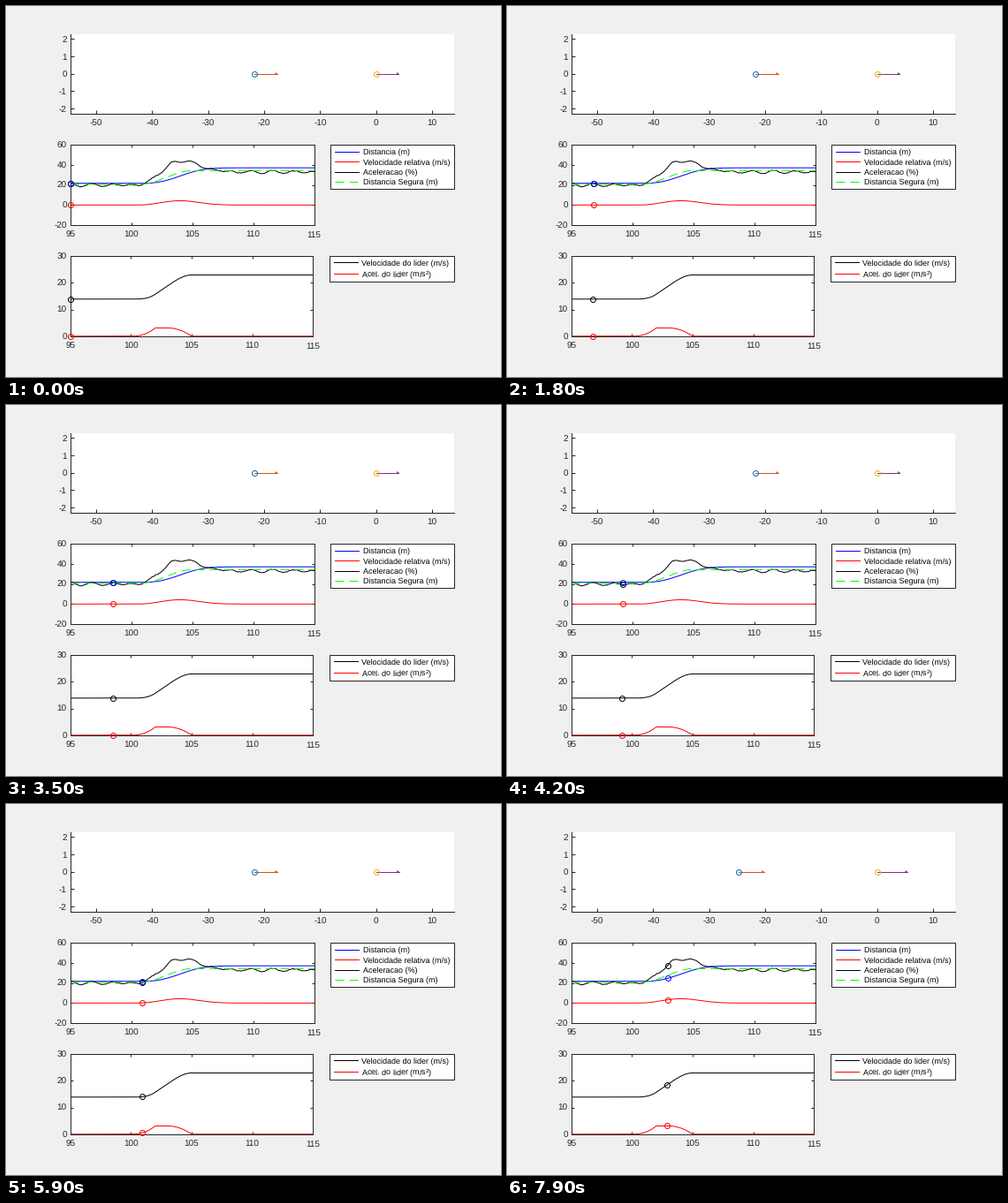
These frames come from a looping animation (560x420 px, 8000 ms). A matplotlib script:

```python
import numpy as np
import matplotlib.pyplot as plt
from matplotlib.animation import FuncAnimation
from matplotlib.patches import Polygon, Rectangle

W, H, PX = 560, 420, 0.72  # stage size and points per pixel
INK, RED, BLUE, GREEN = "#262626", "#ff0000", "#0000ff", "#00ff00"
plt.rcParams.update({
    "font.family": "Liberation Sans", "axes.unicode_minus": False,
    "mathtext.fontset": "custom", "mathtext.rm": "Liberation Sans",
    "mathtext.default": "regular", "lines.linewidth": PX,
    "text.hinting": "none",
})

DT = 0.05
t = 95 + DT * np.arange(401)


def integrate(y):
    return np.concatenate([[0], np.cumsum((y[1:] + y[:-1]) / 2)]) * DT


def ramp(start, end):
    return np.clip((t - start) / (end - start), 0, 1)


def wave(period):
    return np.cos(2 * np.pi * (t - 95.9) / period)


# The leader speeds up between 100 s and 105 s; the follower lags behind.
lead_acc = 3.1 * ramp(100, 102) ** 2.4 * (1 - ramp(103, 105) ** 2)
lead_v = 13.9 + integrate(lead_acc)
rel_v = 4.3 * np.where(t < 104, np.sin(np.pi / 2 * ramp(100.6, 104)) ** 2,
                       np.exp(-((t - 104) / 1.52) ** 2 / 2))
dist = 21.7 + integrate(rel_v)
safe = 1.5 * lead_v
jitter = np.random.default_rng(4).normal(0, .2, t.size // 2 + 1)
throttle = (1.44 * lead_v + 2.6 * rel_v + .8 * lead_acc
            - 1.1 * wave(1.65) - .6 * wave(2.1) + np.interp(t, t[::2], jitter))

fig = plt.figure(figsize=(W / 100, H / 100), dpi=100, facecolor="#f0f0f0")


def panel(bottom, right, xlim, ylim, xticks, yticks, box=True, tick=3, pad=7):
    left = .13
    ax = fig.add_axes([left, bottom, right / W - left, .2157])
    ax.set(xlim=xlim, ylim=ylim, xticks=xticks, yticks=yticks)
    ax.tick_params(direction="in", length=tick * PX, width=PX, color=INK,
                   labelcolor=INK, labelsize=10 * PX, top=box, right=box)
    ax.tick_params(axis="x", pad=pad * PX)
    ax.tick_params(axis="y", pad=4 * PX)
    for side, spine in ax.spines.items():
        spine.set(linewidth=PX, edgecolor=INK,
                  visible=box or side in ("left", "bottom"))
    return ax


def ring(ax, color, z=4):
    return ax.plot([], [], "o", ms=6 * PX, mfc="none", mec=color, mew=PX,
                   clip_on=False, zorder=z)[0]


times = range(95, 116, 5)
road = panel(.7093, 506.8, (-54.6, 13.9), (-2.3, 2.3),
             range(-50, 11, 10), range(-2, 3), False, 4, 6.5)
mid = panel(.4096, 348.6, (95, 115), (-20, 60), times, range(-20, 61, 20))
low = panel(.11, 347.2, (95, 115), (0, 30), times, range(0, 31, 10))

DASH = (0, (10, 6))
mid_rows = [("Distancia (m)", dist, BLUE, "-"),
            ("Velocidade relativa (m/s)", rel_v, RED, "-"),
            ("Aceleracao (%)", throttle, "black", "-"),
            ("Distancia Segura (m)", safe, GREEN, DASH)]
low_rows = [("Velocidade do lider (m/s)", lead_v, "black", "-"),
            ("Acel. do lider (m/s$^2$)", lead_acc, RED, "-")]

sheet = fig.add_axes([0, 0, 1, 1])
sheet.set(xlim=(0, W), ylim=(H, 0))
sheet.axis("off")


def legend(ax, rows, x0, y0, y1, first, step):
    sheet.add_patch(Rectangle((x0, y0), 507 - x0, y1 - y0, fc="white",
                              ec=INK, lw=PX))
    for i, (name, data, color, style) in enumerate(rows):
        ax.plot(t, data, color=color, ls=style)
        y = first + i * step
        sheet.plot([x0 + 4.5, x0 + 31.5], [y, y], color=color, ls=style)
        sheet.text(x0 + 36.5, y + 3.4, name, size=9 * PX, color="black",
                   va="baseline")


legend(mid, mid_rows, 367, 157, 207, 165, 11.4)
legend(low, low_rows, 366, 283, 312, 290.3, 13)

markers = [(ring(mid, BLUE, 5), dist), (ring(mid, RED), rel_v),
           (ring(mid, "black"), throttle),
           (ring(low, "black"), lead_v), (ring(low, RED), lead_acc)]


def car(body, arrow):
    shaft, = road.plot([], [], color=arrow)
    head = road.add_patch(Polygon(np.zeros((3, 2)), fc=arrow, ec=arrow,
                                  lw=.4 * PX, zorder=3, snap=False))
    return ring(road, body), shaft, head


def place(parts, x, v):
    dot, shaft, head = parts
    tip = x + .292 * v
    dot.set_data([x], [0])
    shaft.set_data([x, tip], [0, 0])
    head.set_xy([(tip, 0), (tip - .35, .07), (tip - .35, -.07)])


follower = car("#0072bd", "#d95319")
leader = car("#edb120", "#7e2f8e")


def draw(frame):
    now = 95 + frame / 10
    for dot, data in markers:
        dot.set_data([now], [np.interp(now, t, data)])
    gap, v, dv = (np.interp(now, t, s) for s in (dist, lead_v, rel_v))
    place(follower, -gap, v - dv)
    place(leader, 0, v)
    return []


anim = FuncAnimation(fig, draw, frames=80, interval=100, repeat=True,
                     repeat_delay=0)
plt.show()
```
